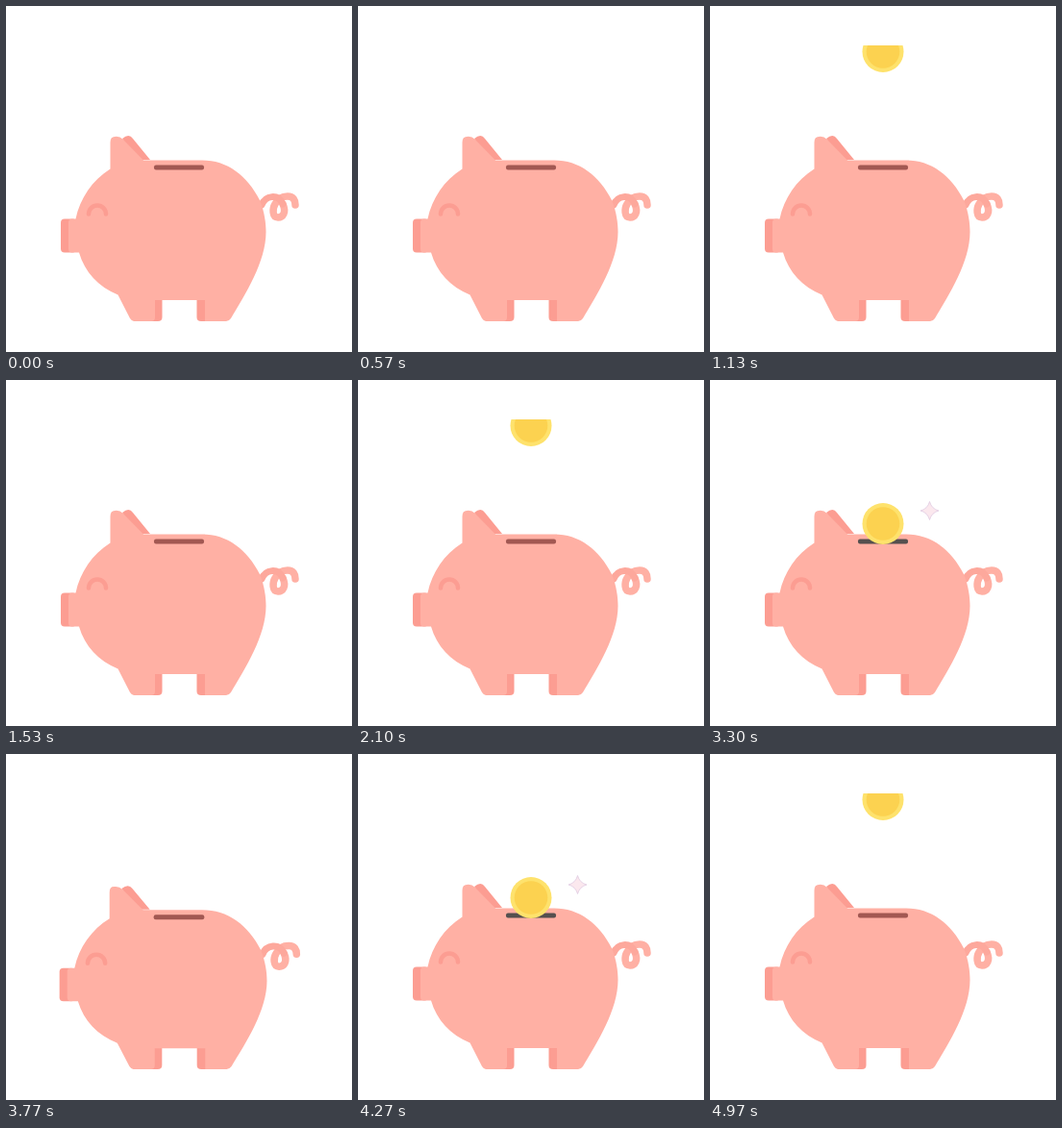
Animation of 360 by 360 pixels, one loop 5.07 s. Source, as an HTML page:

```html
<!DOCTYPE html>
<html lang="en">
<head>
<meta charset="utf-8">
<title>Piggy bank</title>
<style>
  html, body { margin: 0; width: 100%; height: 100%; overflow: hidden; background: #fff; }
  svg { display: block; width: 100vw; height: 100vh; }
  .skin { fill: #ffb0a4; }
  .shade { fill: #fc9d92; }
  .line { fill: none; stroke-linecap: round; stroke-linejoin: round; }
</style>
</head>
<body>
<svg viewBox="0 0 360 360">
  <clipPath id="window"><rect id="opening" x="140" y="41" width="80" height="130"/></clipPath>

  <g id="pig">
    <!-- tail -->
    <path class="line" stroke="#ffb0a4" stroke-width="7.5"
      d="M288 206C292 215 288 220 283 220C277 220 277 211 280 206C283 200 288 198 293 198C299 198 301 202 301 207"/>
    <path class="line" stroke="#fda89c" stroke-width="7" d="M266 207C270 197 283 195 288 206"/>
    <!-- far ear, snout end, inner legs -->
    <path class="shade" d="M121 138Q128 132 132 138L150 160L134 160Z"/>
    <rect class="shade" x="57" y="221.5" width="16" height="35" rx="4"/>
    <path class="shade" d="M150 304H162.5V324Q162.5 328 158 328H140Z"/>
    <path class="shade" d="M198.5 304H215V328H203Q198.5 328 198.5 324Z"/>
    <!-- body -->
    <path class="skin" d="M72.5 221.5C77 200 90 181 108.5 169.500V142Q108.500 136 113 136Q118 135 122 139L143 160.500H204
      C230 160.500 251 176 264.500 203C269 215 270.500 226 270.500 235C270.500 266 249 300 234 325Q232 328 229 328H207V306H155V324
      Q155 328 151 328H133Q131 328 129 325L116.500 300.500C96 292 82 277 76 256.500H69Q65 256.500 65 253V225Q65 221.500 69 221.500Z"/>
    <path class="line" stroke="#fc9d92" stroke-width="4.5" d="M86 216.500A9 9 0 0 1 104 216.500"/>
    <rect id="slot" x="154" y="165.5" width="52" height="5" rx="2"/>
  </g>

  <g clip-path="url(#window)">
    <g id="coin">
      <circle r="21.5" fill="#fee26c"/>
      <circle r="17.3" fill="#fcd250"/>
    </g>
  </g>

  <path id="sparkle" d="M228.5 126.5Q230.5 134 238 136Q230.5 138 228.5 145.5Q226.5 138 219 136Q226.5 134 228.5 126.5Z"
    fill="#fbe8ee" stroke="#dcc4de" stroke-width=".7"/>
</svg>
<script>
  const LOOP = 5070, START = 170, STEP = 80, STEPS = 12;
  const FLOOR = 329, CENTER = 180.5;
  // Horizontal squash per step; negative values stretch the pig upwards.
  const squash = [0, 0, 0, 0, .056, 0, -.036, 0, .024, .011, 0, 0];
  const [pig, slot, coin, opening, sparkle] =
    ["pig", "slot", "coin", "opening", "sparkle"].map(id => document.getElementById(id));
  const show = (node, on) => node.setAttribute("visibility", on ? "visible" : "hidden");

  function draw(time) {
    const step = time < START ? STEPS - 1 : Math.floor((time - START) / STEP) % STEPS;
    const sx = 1 + squash[step], sy = 1 - squash[step];
    pig.setAttribute("transform",
      `translate(${CENTER} ${FLOOR}) scale(${sx} ${sy}) translate(${-CENTER} ${-FLOOR})`);

    const slotBottom = FLOOR - (FLOOR - 171) * sy;
    opening.setAttribute("height", slotBottom - 41);
    coin.setAttribute("transform", `translate(180 ${47.5 + 34 * step})`);
    show(coin, step <= 4);

    const hit = step === 3 || step === 4;
    slot.setAttribute("fill", hit ? "#55504f" : "#a25852");
    show(sparkle, hit);
  }

  function tick() {
    draw(performance.now() % LOOP);
    requestAnimationFrame(tick);
  }
  tick();
</script>
</body>
</html>
```
